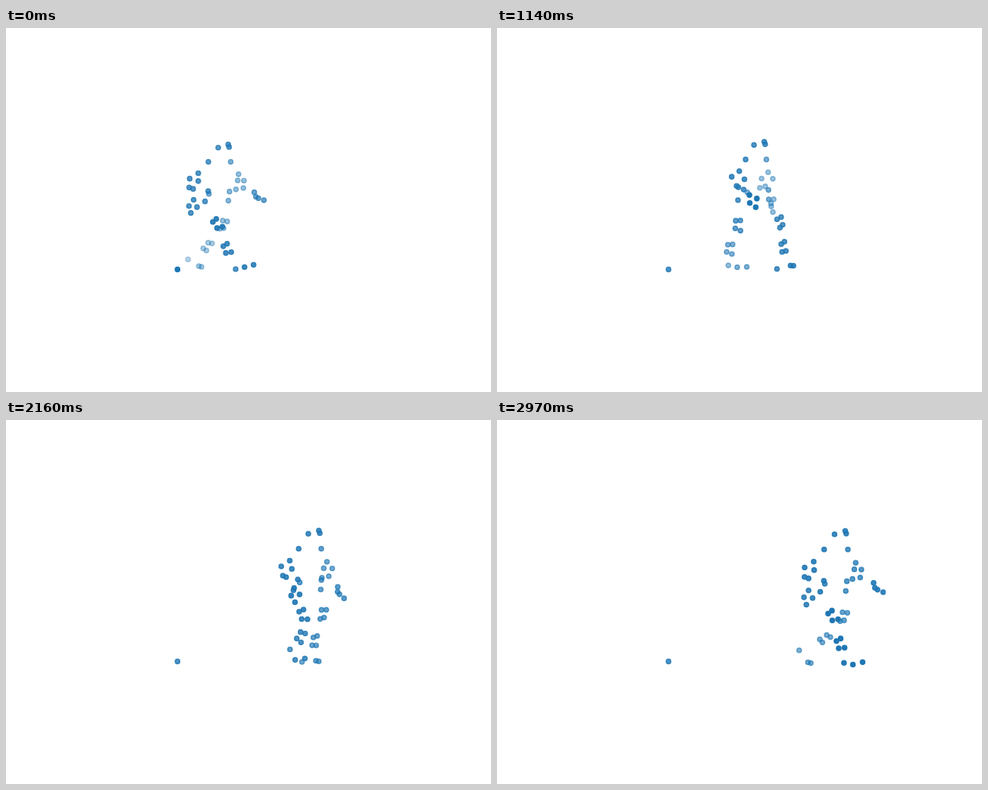
An HTML page with a canvas for the animation above (3000 ms loop, 640 by 480 pixels).

```html
<!DOCTYPE html>
<html lang="en">
<head>
<meta charset="utf-8">
<title>Walking markers</title>
<style>
html, body { margin: 0; width: 100%; height: 100%; overflow: hidden; background: #fff; }
canvas { display: block; width: 640px; height: 480px; }
</style>
</head>
<body>
<canvas id="stage" width="640" height="480"></canvas>
<script>
const ctx = document.getElementById('stage').getContext('2d');
const LOOP = 3000, STEP = 30, STRIDE = 2730;
const RAD = Math.PI / 180;
const NEAR_LAG = 10 * RAD;

// Mean value followed by [cos, sin] weights of the 1st, 2nd, 3rd harmonic.
function wave(phase, [mean, ...harmonics]) {
  return harmonics.reduce((sum, [a, b], i) =>
    sum + a * Math.cos((i + 1) * phase) + b * Math.sin((i + 1) * phase), mean);
}

// Markers on the trunk and upper arms: [x, y, sway], measured from the forehead.
// tone is [base opacity, change over the stride].
const trunk = [
  { tone: [.75, 0], at: [[0, 0, 0], [-13.2, 4.1, 0], [1.2, 3.3, 0], [-25, 22.8, -1.2]] },
  { tone: [.54, .03], at: [[3, 22.8, .3]] },
  { tone: [.78, 0], at: [[-35.5, 37.8, -4], [-46, 45, -4.8], [-32, 48.2, -7.5],
                         [-43, 56.7, -8.5], [-39.3, 58.5, -7]] },
  { tone: [.4, .08], at: [[9, 39.2, 4.6], [4, 47.3, 8.5], [15.5, 47.6, 5.2],
                          [10, 57.4, 10], [1.7, 59.2, 8.5]] },
  { tone: [.74, .02], at: [[-26.4, 61.5, 0], [-32.3, 75, 1.7]] },
  { tone: [.54, .06], at: [[-23.5, 65.1, -2]] },
  { tone: [.52, 0], at: [[3.7, 62, -2], [3.2, 74, -3]] }
];

// Hands: rigid clusters that travel and turn.
const hands = [
  { x: [-28.7, [-18.3, -3.5]], y: [79.5, [3.5, .5], [-1.3, 0]], turn: [-20, [21, 0]],
    tone: [.9, -.12], at: [[1.2, -8.8], [-4.8, -.5], [5.8, .7], [-2.2, 8.6]] },
  { x: [24, [17, 3.5], [-1.5, 0]], y: [77.4, [-6.5, -1], [-1.8, 0]], turn: [28, [-29, 0]],
    tone: [.52, .16], at: [[-5, -6.2], [-3, -.3], [.3, 1.8], [7.5, 4.5]] }
];

// Leg parts share one cycle; the far leg runs half a stride later.
const legs = [
  { // knee
    x: [0, [13.5, -2], [-2, .2]], y: [105, [-1.3, 0]], turn: [0, [-20, 3]], swing: .13,
    near: { x: -24, y: 1, gain: .8, base: .78, at: [[1.2, -6.5], [-4.4, -4.4], [-2, 5.1], [5.2, 5.9]] },
    far: { x: 9, y: -.4, gain: 1, base: .59, at: [[-2.6, -5], [3.3, -5.9], [-2.6, 6.5], [1.9, 4.1]] }
  },
  { // shank
    x: [0, [26, -.7], [-1.1, -3]], y: [136.1, [1.6, 3.5]], turn: [36.5, [-27, -18], [-5.5, 10]], swing: .18,
    near: { x: -27, y: .4, gain: .98, base: .66, at: [[-.2, -6.7], [-4.9, -2.9], [6.1, 3.9], [-.9, 5.6]] },
    far: { x: -.3, y: -.3, gain: 1, base: .56, at: [[-3.5, -3.3], [0, -7.1], [-.6, 6.2], [4, 4.1]] }
  },
  { // heel
    x: [0, [34.2, 5.7], [2.7, -8], [0, -2.7]], y: [157.3, [6.2, 7.3], [.4, -3], [0, -1.5]], turn: [0], swing: .21,
    near: { x: -29.5, y: 0, gain: 1, base: .57, at: [[0, 0]] },
    far: { x: -21.5, y: 0, gain: 1, base: .53, at: [[0, 0]] }
  },
  { // toes
    x: [0, [36, 8.2], [3.4, -10], [0, -2.5]], y: [162.2, [.1, 1.6], [-1.3, 2]], turn: [0, [-7, 0]], swing: .2,
    near: { x: -14.4, y: 0, gain: 1, base: .67, at: [[-6.1, .8], [6.1, -.8]] },
    far: { x: -4.4, y: 0, gain: 1, base: .61, at: [[-1.8, -.3], [1.8, .3]] }
  }
];

function pose(t) {
  const phase = 2 * Math.PI * t / STRIDE, u = t / LOOP;
  const scale = 1 + .07 * u;
  const headX = 292.4 + .0525 * t + 1.25e-6 * t * t + 1.3 * Math.cos(phase + 50 * RAD);
  const headY = 152.2 - .00231 * t + 1.5 * Math.cos(2 * phase - 15 * RAD);
  const dots = [];

  const put = (x, y, a) => dots.push({ x: headX + scale * x, y: headY + scale * y, a });
  // Markers grow more solid as the walker comes closer.
  const shade = (base, swing, p) =>
    Math.min(1, base + swing * Math.cos(p) + .5 * (1 - base) * u);
  const cluster = (cx, cy, degrees, points, a) => {
    const c = Math.cos(degrees * RAD), s = Math.sin(degrees * RAD);
    for (const [x, y] of points) put(cx + x * c - y * s, cy + x * s + y * c, a);
  };

  for (const { tone, at } of trunk)
    for (const [x, y, sway] of at)
      put(x + sway * Math.cos(phase), y, shade(...tone, phase));

  for (const h of hands)
    cluster(wave(phase, h.x), wave(phase, h.y), wave(phase, h.turn), h.at, shade(...h.tone, phase));

  for (const part of legs)
    for (const [side, p] of [[part.near, phase - NEAR_LAG], [part.far, phase + Math.PI]])
      cluster(side.x + side.gain * wave(p, part.x), side.y + wave(p, part.y),
              wave(p, part.turn), side.at, shade(side.base, part.swing, p));

  // marker left at the start of the walk
  const fade = Math.min(1, Math.max(0, (900 - t) / 350));
  dots.push({ x: 226.3, y: 318.4, a: .8 + .2 * fade });
  return dots.sort((p, q) => p.a - q.a);
}

function dot({ x, y, a }) {
  ctx.globalAlpha = a;
  ctx.beginPath();
  ctx.arc(x, y, 3.1, 0, Math.PI * 2);
  ctx.fill();
  ctx.stroke();
}

function draw(t) {
  ctx.globalAlpha = 1;
  ctx.fillStyle = '#fff';
  ctx.fillRect(0, 0, 640, 480);
  ctx.save();
  ctx.beginPath();
  ctx.rect(143.2, 57.6, 369.6, 369.6);
  ctx.clip();
  ctx.fillStyle = ctx.strokeStyle = '#1f77b4';
  ctx.lineWidth = 1.39;
  pose(t).forEach(dot);
  ctx.restore();
}

const start = performance.now();
function tick() {
  const t = (performance.now() - start) % LOOP;
  draw(Math.floor(t / STEP) * STEP);
  requestAnimationFrame(tick);
}
tick();
</script>
</body>
</html>
```
